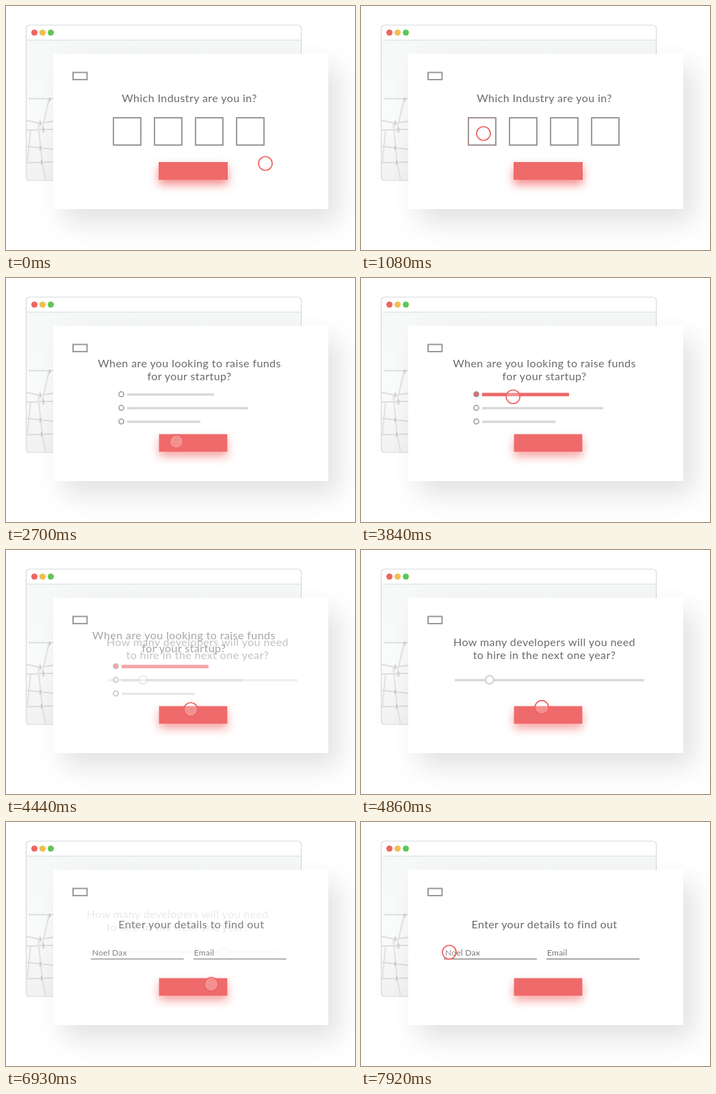
An HTML page that plays this animation: 510 px wide and 358 px high, repeating every 8000 ms.

```html
<!DOCTYPE html>
<html lang="en">
<head>
<meta charset="utf-8">
<title>Survey walkthrough</title>
<style>
  html, body { margin: 0; width: 100%; height: 100%; overflow: hidden; background: #fff; }
  #stage { position: relative; width: 510px; height: 358px; overflow: hidden; background: #fff; }
  svg { position: absolute; left: 0; top: 0; }
  #card { position: absolute; left: 69px; top: 70px; width: 402px; height: 228px;
    background: #fff; box-shadow: 15px 19px 38px rgba(0, 0, 0, .12); }
  #button { position: absolute; left: 223px; top: 229px; width: 101px; height: 26px; background: #ef6a6a; }
  text { font-family: Lato, "Open Sans", sans-serif; fill: #6a6a6a; }
  .title { font-size: 16px; letter-spacing: .42px; text-anchor: middle; }
  .field { font-size: 12px; letter-spacing: .25px; fill: #707070; }
  .box { fill: none; stroke: #999; stroke-width: 2; }
  .bar { stroke: #d8d8d8; stroke-width: 3.4; }
  .radio { fill: #fff; stroke: #888; stroke-width: 1.3; }
  .line { stroke: #8c8c8c; stroke-width: 1.6; }
</style>
</head>
<body>
<div id="stage">
  <svg width="510" height="358">
    <defs>
      <linearGradient id="wall" x1="0" y1="0" x2="0" y2="1">
        <stop offset="0" stop-color="#f6f8f8"/>
        <stop offset=".5" stop-color="#fafbfb"/>
        <stop offset="1" stop-color="#f1f1f1"/>
      </linearGradient>
      <clipPath id="pane"><rect x="30" y="50" width="402" height="206" rx="4"/></clipPath>
    </defs>
    <rect x="29.5" y="28" width="402" height="228" rx="5" fill="#fff"/>
    <g clip-path="url(#pane)">
      <rect x="30" y="50" width="402" height="207" fill="url(#wall)"/>
      <g fill="none" stroke="#d6d6d6" stroke-width="1.3">
        <path d="M33 136H69M30 168L50 172L69 169M30 182L69 181M30 206L69 210M30 230L69 229"/>
        <path d="M47 171L53 230L58 256M63 136L52 184M36 182L31 230" stroke="#e2e2e2" stroke-width="2"/>
        <path d="M50 168V176M55 178V186M50 205V212M64 134V140M52 226V233" stroke="#bdbdbd"/>
      </g>
    </g>
    <path d="M30 50H431" stroke="#d9dcdc"/>
    <rect x="29.5" y="28" width="402" height="228" rx="5" fill="none" stroke="#d5dad8" stroke-width="1.2"/>
    <circle cx="41.5" cy="39" r="4.5" fill="#ed6560"/>
    <circle cx="53.5" cy="39" r="4.5" fill="#f4bd4e"/>
    <circle cx="65.5" cy="39" r="4.5" fill="#61c653"/>
  </svg>

  <div id="card"></div>
  <div id="button"></div>

  <svg width="510" height="358">
    <rect class="box" x="98" y="97.5" width="20.5" height="10.5"/>

    <g class="scene">
      <text class="title" x="268" y="141">Which Industry are you in?</text>
      <rect class="box" id="pick" x="157" y="164" width="40" height="40"/>
      <rect class="box" x="217" y="164" width="40" height="40"/>
      <rect class="box" x="277" y="164" width="40" height="40"/>
      <rect class="box" x="337" y="164" width="40" height="40"/>
    </g>

    <g class="scene">
      <text class="title" x="268" y="131">When are you looking to raise funds</text>
      <text class="title" x="268" y="150">for your startup?</text>
      <circle class="radio" id="dot" cx="168.5" cy="170.5" r="3.6"/>
      <circle class="radio" cx="168.5" cy="190.5" r="3.6"/>
      <circle class="radio" cx="168.5" cy="210.5" r="3.6"/>
      <path class="bar" id="option" d="M177 171H304"/>
      <path class="bar" d="M177 191H354"/>
      <path class="bar" d="M177 211H284"/>
    </g>

    <g class="scene">
      <text class="title" x="268" y="141">How many developers will you need</text>
      <text class="title" x="268" y="160">to hire in the next one year?</text>
      <path class="bar" d="M137 191H414"/>
      <circle id="knob" cy="190.5" r="6" fill="#fff" stroke="#d4d4d4" stroke-width="2.4"/>
    </g>

    <g class="scene">
      <text class="title" x="268" y="156">Enter your details to find out</text>
      <text class="field" x="123" y="196">Noel Dax</text>
      <text class="field" x="272" y="196">Email</text>
      <path class="line" d="M121 201H257M271 201H407"/>
    </g>

    <circle id="cursor" r="10" fill="#fff" fill-opacity=".26" stroke="#ee6464" stroke-width="1.7"/>
  </svg>
</div>

<script>
const LOOP = 8000;
const GREY = [153, 153, 153], PALE = [216, 216, 216], RED = [238, 104, 104], WHITE = [255, 255, 255];

// Cursor stops: [time, x, y]
const STOPS = [
  [540, 379, 231], [1010, 179, 187],
  [1650, 179, 187], [2060, 249, 240],
  [2690, 249, 240], [3130, 222, 174],
  [3825, 222, 174], [4230, 270, 234],
  [4800, 270, 234], [5170, 190, 191],
  [6080, 340, 191], [6560, 300, 238],
  [7140, 300, 238], [7720, 129, 191]
];
const DRAG = [[5170, 188], [6080, 336]];
const SLIDES = [2070, 4230, 6560];
const SLIDE_TIME = 485, SHIFT = 20;

const $ = id => document.getElementById(id);
const scenes = [...document.querySelectorAll(".scene")];
const pick = $("pick"), dot = $("dot"), option = $("option");
const knob = $("knob"), cursor = $("cursor"), button = $("button");

const ramp = (t, a, b) => {
  const p = Math.min(1, Math.max(0, (t - a) / (b - a)));
  return p * p * (3 - 2 * p);
};
const mix = (a, b, p) => a + (b - a) * p;
const blend = (a, b, p) => `rgb(${a.map((v, i) => Math.round(mix(v, b[i], p)))})`;

function track(stops, t, col) {
  let value = stops[0][col];
  for (let i = 1; i < stops.length; i++) {
    value += (stops[i][col] - stops[i - 1][col]) * ramp(t, stops[i - 1][0], stops[i][0]);
  }
  return value;
}

function draw(t) {
  scenes.forEach((scene, i) => {
    const enter = i ? ramp(t, SLIDES[i - 1], SLIDES[i - 1] + SLIDE_TIME) : 1;
    const leave = i < SLIDES.length ? ramp(t, SLIDES[i], SLIDES[i] + SLIDE_TIME) : 0;
    scene.setAttribute("transform", `translate(${SHIFT * (1 - enter - leave)} 0)`);
    scene.setAttribute("opacity", enter * (1 - leave));
  });

  pick.style.stroke = blend(GREY, RED, ramp(t, 1000, 1395));

  const chosen = ramp(t, 3120, 3525);
  option.style.stroke = blend(PALE, RED, chosen);
  option.style.strokeWidth = mix(3.4, 5, chosen);
  dot.style.fill = blend(WHITE, RED, chosen);

  knob.setAttribute("cx", track(DRAG, t, 1));
  cursor.setAttribute("cx", track(STOPS, t, 1));
  cursor.setAttribute("cy", track(STOPS, t, 2));

  const pressed = ramp(t, 2080, 2400);
  button.style.transform = `scale(${mix(1, .988, pressed)})`;
  button.style.boxShadow = `0 7px 14px rgba(240, 84, 84, ${mix(.68, .54, pressed)})`;
}

const start = performance.now();
function tick() {
  draw((performance.now() - start) % LOOP);
  requestAnimationFrame(tick);
}
tick();
</script>
</body>
</html>
```
